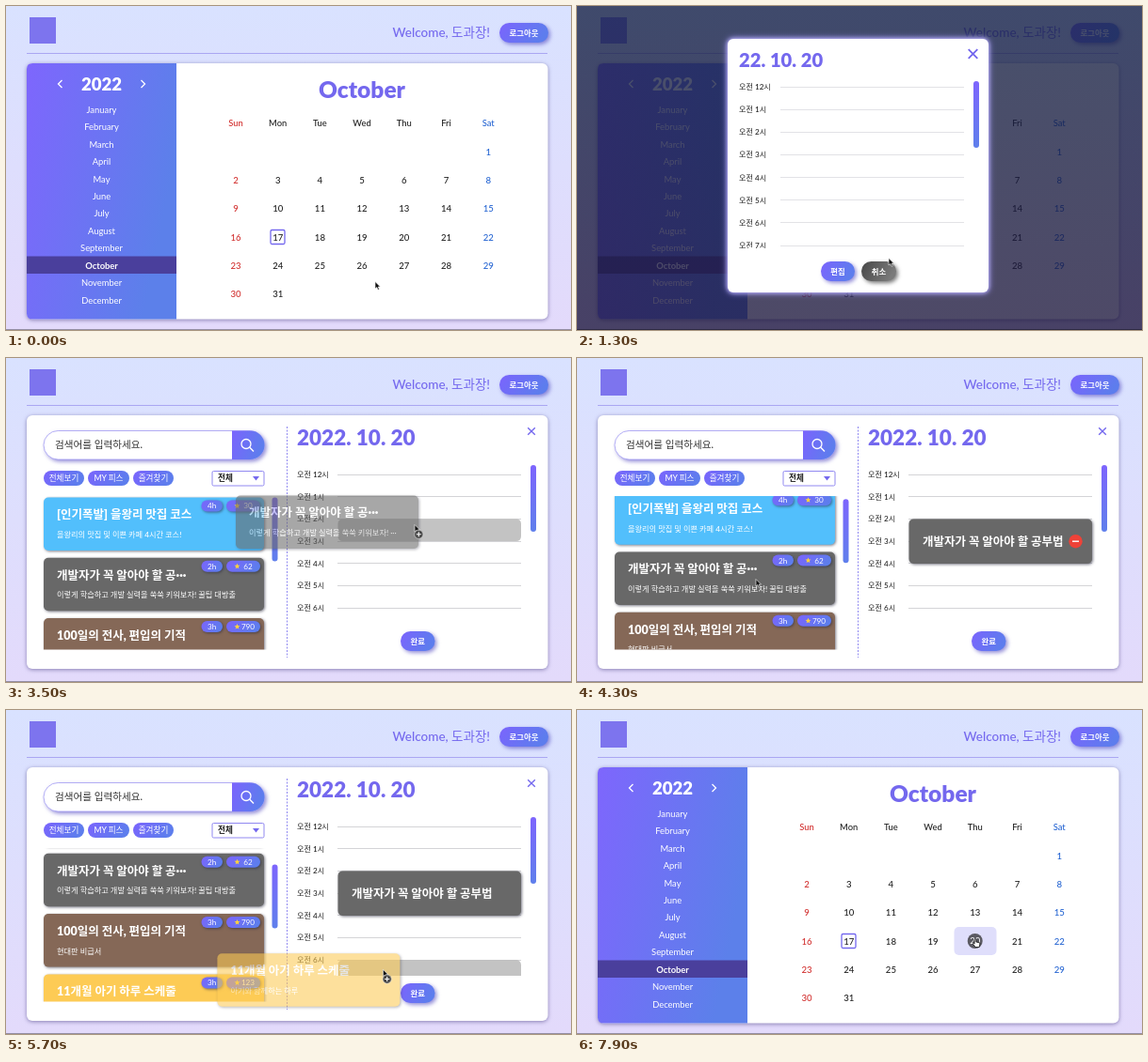
An HTML page for the animation above (8 s loop, 600 by 345 pixels).

```html
<!DOCTYPE html>
<html lang="ko">
<head>
<meta charset="utf-8">
<title>Calendar planner</title>
<style>
  html, body { margin: 0; width: 100%; height: 100%; overflow: hidden; background: #dee0fe; }
  svg { display: block; width: 100vw; height: 100vh; }
  text { font-family: Lato, 'Noto Sans CJK KR', 'Noto Sans CJK', sans-serif; white-space: pre; }
  .panel { filter: drop-shadow(0 1px 2px rgba(60, 50, 120, .55)); }
  .btn { filter: drop-shadow(2px 2px 2px rgba(75, 65, 190, .6)); }
  .dark { filter: drop-shadow(2px 2px 2px rgba(30, 30, 30, .6)); }
  .card { filter: drop-shadow(1px 1px 1.5px rgba(40, 40, 60, .6)); }
  .glow { filter: drop-shadow(0 0 2px #c4bcff) drop-shadow(0 0 3px #9c92f0); }
</style>
</head>
<body>
<svg id="stage" viewBox="0 0 600 345" preserveAspectRatio="none">
  <defs>
    <linearGradient id="bg" x2="0" y2="1"><stop stop-color="#d9e2ff"/><stop offset="1" stop-color="#e3dafb"/></linearGradient>
    <linearGradient id="side" x2="1" y2=".35"><stop stop-color="#7e66fd"/><stop offset="1" stop-color="#5c80ea"/></linearGradient>
    <linearGradient id="pill" x2="1" y2=".3"><stop stop-color="#7b64fd"/><stop offset="1" stop-color="#5d7ded"/></linearGradient>
    <linearGradient id="bar" x2="0" y2="1"><stop stop-color="#7d65fd"/><stop offset="1" stop-color="#5f7fec"/></linearGradient>
    <linearGradient id="gray" x2="1" y2=".3"><stop stop-color="#474747"/><stop offset="1" stop-color="#7a7a7a"/></linearGradient>
    <linearGradient id="shade" x2="0" y2="1"><stop stop-color="#141f42"/><stop offset="1" stop-color="#1c163c"/></linearGradient>
    <clipPath id="modalClip"><rect x="165" y="75" width="250" height="183"/></clipPath>
    <clipPath id="listClip"><rect x="36" y="147" width="243" height="163.5"/></clipPath>
    <clipPath id="dayClip"><rect x="305" y="110" width="246" height="173"/></clipPath>
  </defs>
</svg>
<script>
const NS = 'http://www.w3.org/2000/svg';
const LOOP = 8000, STEP = 100;
const PURPLE = '#7468ee';

function el(parent, tag, attrs, str) {
  const node = document.createElementNS(NS, tag);
  for (const k in attrs) node.setAttribute(k, attrs[k]);
  if (str !== undefined) node.textContent = str;
  parent.appendChild(node);
  return node;
}
const group = (p, attrs = {}) => el(p, 'g', attrs);
const rect = (p, x, y, width, height, fill, rx = 0, attrs = {}) =>
  el(p, 'rect', { x, y, width, height, fill, rx, ...attrs });
const path = (p, d, stroke, width = 1, attrs = {}) =>
  el(p, 'path', { d, stroke, 'stroke-width': width, fill: 'none', ...attrs });
// y is the optical middle of the line
const text = (p, x, y, str, size, fill, weight = 400, anchor = 'start') =>
  el(p, 'text', { x, y: y + size * .36, 'font-size': size, fill, 'font-weight': weight, 'text-anchor': anchor }, str);
const show = (node, on) => node.setAttribute('display', on ? 'inline' : 'none');
const move = (node, x, y) => node.setAttribute('transform', `translate(${x} ${y})`);

function button(p, x, y, w, h, label, fill = 'url(#pill)', cls = 'btn') {
  rect(p, x, y, w, h, fill, h / 2, { class: cls });
  text(p, x + w / 2, y + h / 2, label, 8.4, '#fff', 700, 'middle');
}
function chip(p, x, w, label) {
  rect(p, x, 120, w, 16, 'url(#pill)', 8);
  text(p, x + w / 2, 128, label, 8.6, '#fff', 500, 'middle');
}
function cross(p, x, y, r, width) {
  path(p, `M${x - r} ${y - r}L${x + r} ${y + r}M${x + r} ${y - r}L${x - r} ${y + r}`, PURPLE, width);
}
function hours(p, x, y, gap, x1, x2, count, color) {
  for (let i = 0; i < count; i++) {
    const mid = y + gap * i;
    text(p, x, mid, `오전 ${i || 12}시`, 8.1, '#222', 500);
    path(p, `M${x1} ${Math.floor(mid) + .5}H${x2}`, color);
  }
}

const svg = document.getElementById('stage');
rect(svg, 0, 0, 600, 345, 'url(#bg)');

// Header
rect(svg, 25, 12, 28, 28, '#7d74ee');
text(svg, 514, 28.5, 'Welcome, 도과장!', 13.5, PURPLE, 500, 'end');
button(svg, 524, 18, 52, 21, '로그아웃');
path(svg, 'M22 50.5H575', '#aaa6f2');

// Calendar page
const calendar = group(svg);
rect(calendar, 22, 61, 553.5, 272.5, '#fff', 6, { class: 'panel' });
path(calendar, 'M181 61H28Q22 61 22 67V327.500Q22 333.500 28 333.500H181Z', 'none', 0, { fill: 'url(#side)' });
text(calendar, 101.5, 83, '2022', 18.6, '#fff', 900, 'middle');
path(calendar, 'M59.500 79L55.500 83L59.500 87M143.500 79L147.500 83L143.500 87', '#fff', 1.3);
rect(calendar, 22, 266.5, 159, 18.5, '#4a3f9c');
'January February March April May June July August September October November December'
  .split(' ').forEach((name, i) =>
    text(calendar, 101.5, 110.5 + 18.42 * i, name, 9.4, '#fff', i === 9 ? 700 : 400, 'middle'));
text(calendar, 378, 89, 'October', 24.5, PURPLE, 900, 'middle');

const dayColor = c => c === 0 ? '#d2302f' : c === 6 ? '#2464d2' : '#222';
const colX = c => 244 + 44.7 * c;
const cell = group(calendar);
rect(cell, 400.5, 231, 45, 30, '#dfdefb', 5);
'Sun Mon Tue Wed Thu Fri Sat'.split(' ').forEach((name, c) =>
  text(calendar, colX(c), 125, name, 9.4, dayColor(c), 500, 'middle'));
for (let d = 1; d <= 31; d++) {
  const c = (d + 5) % 7, r = Math.floor((d + 5) / 7);
  text(calendar, colX(c), 155.5 + 30.2 * r, d, 9.6, dayColor(c), 500, 'middle');
}
rect(calendar, 281, 238.5, 15, 15, 'none', 1.5, { stroke: PURPLE, 'stroke-width': 1.3 });
const dot = group(calendar);
el(dot, 'circle', { cx: 422.7, cy: 246, r: 8, fill: '#5b5a62' });
text(dot, 422.7, 246, '20', 9.6, '#fff', 400, 'middle');

// Day dialog
const modal = group(svg);
rect(modal, 0, 0, 600, 345, 'url(#shade)', 0, { opacity: .78 });
rect(modal, 160, 35, 277, 270, '#fff', 6, { class: 'glow' });
text(modal, 172, 57.5, '22. 10. 20', 20.2, PURPLE, 900);
cross(modal, 420.5, 51, 4.8, 1.9);
hours(group(modal, { 'clip-path': 'url(#modalClip)' }), 172, 86, 24.15, 216, 411, 8, '#e2e2e6');
rect(modal, 421, 80, 6, 71, 'url(#bar)', 3);
button(modal, 259, 272, 36, 21, '편집');
button(modal, 302, 272, 37, 21, '취소', 'url(#gray)', 'dark');

// Planner page
const planner = group(svg);
rect(planner, 22, 61, 553.5, 270, '#fff', 6, { class: 'panel' });
path(planner, 'M298.500 73V319', '#8f88f0', 1, { 'stroke-dasharray': '2 1.5' });
rect(planner, 40, 77.5, 234.5, 30.5, '#fff', 15.2, { class: 'btn', stroke: '#a49ef4', 'stroke-width': .8 });
path(planner, 'M240 77.500H259.300A15.200 15.200 0 0 1 259.300 108H240Z', 'none', 0, { fill: 'url(#pill)' });
el(planner, 'circle', { cx: 255, cy: 91.5, r: 5, fill: 'none', stroke: '#fff', 'stroke-width': 1.3 });
path(planner, 'M258.600 95.100L263 99.500', '#fff', 1.4);
text(planner, 52, 92.5, '검색어를 입력하세요.', 10.6, '#333', 500);
chip(planner, 40, 43, '전체보기');
chip(planner, 87, 44, 'MY 피스');
chip(planner, 135, 43, '즐겨찾기');
rect(planner, 219, 120.5, 55, 15.5, '#fff', 1.5, { stroke: '#9088f0' });
text(planner, 225, 128.2, '전체', 8.6, '#222', 700);
path(planner, 'M262 126H269L265.500 130.500Z', 'none', 0, { fill: PURPLE });

const pieces = [
  { title: '[인기폭발] 을왕리 맛집 코스', sub: '을왕리의 맛집 및 이쁜 카페 4시간 코스!', time: '4h', likes: 30, fill: '#52bffc' },
  { title: '개발자가 꼭 알아야 할 공···', sub: '이렇게 학습하고 개발 실력을 쑥쑥 키워보자! 꿀팁 대방출', time: '2h', likes: 62, fill: '#686868' },
  { title: '100일의 전사, 편입의 기적', sub: '현대판 비급서', time: '3h', likes: 790, fill: '#856857' },
  { title: '11개월 아기 하루 스케줄', sub: '아기와 함께하는 하루', time: '3h', likes: 123, fill: '#fdcb55' }
];
function card(p, x, y, w, piece, sub = piece.sub) {
  rect(p, x, y, w, 56.5, piece.fill, 5, { class: 'card' });
  text(p, x + 14, y + 18.3, piece.title, 12.5, '#fff', 900);
  text(p, x + 14, y + 39.5, sub, 8.2, '#fff', 500);
}
const list = group(group(planner, { 'clip-path': 'url(#listClip)' }));
pieces.forEach((piece, i) => {
  const y = 148.5 + 64.3 * i;
  card(list, 40, y, 234, piece);
  rect(list, 207.5, y + 3, 22.5, 12, 'url(#pill)', 6, { class: 'card' });
  rect(list, 234, y + 3, 36, 12, 'url(#pill)', 6, { class: 'card' });
  text(list, 218.7, y + 9, piece.time, 8.2, '#fff', 400, 'middle');
  let star = '';
  for (let k = 0; k < 10; k++) {
    const a = Math.PI * k / 5, r = k % 2 ? 1.4 : 3.1;
    star += `${k ? 'L' : 'M'}${245.5 + r * Math.sin(a)} ${y + 9 - r * Math.cos(a)}`;
  }
  path(list, star + 'Z', 'none', 0, { fill: '#ffd23f' });
  text(list, 257, y + 9, piece.likes, 8.2, '#fff', 400, 'middle');
});
const listBar = rect(planner, 282.5, 148.5, 6, 68, 'url(#bar)', 3);

text(planner, 309, 85, '2022. 10. 20', 22.5, PURPLE, 900);
cross(planner, 558, 78, 3.8, 1.4);
const day = group(planner, { 'clip-path': 'url(#dayClip)' });
hours(day, 309, 124, 23.7, 352, 547, 7, '#d4d4d7');
rect(planner, 557, 114, 6, 71, 'url(#bar)', 3);
const slot = rect(day, 352.5, 171.4, 194.5, 23.7, '#b4b4b4', 5, { opacity: .8 });
const plan1 = group(day);
rect(plan1, 352.5, 171.4, 194.5, 47.5, pieces[1].fill, 5, { class: 'card' });
text(plan1, 367, 195.2, '개발자가 꼭 알아야 할 공부법', 12.5, '#fff', 900);
const remove = group(plan1);
el(remove, 'circle', { cx: 529.5, cy: 195.2, r: 7.2, fill: '#ee4238' });
path(remove, 'M526 195.200H533', '#fff', 1.4);
const plan2 = group(day);
rect(plan2, 352.5, 266.2, 194.5, 71, pieces[3].fill, 5, { class: 'card' });
button(planner, 419, 291, 36.5, 21, '완료');

// Dragged cards, drawn relative to the pointer
const ghost1 = group(svg, { opacity: .58 });
card(ghost1, -190, -31, 194, pieces[1], '이렇게 학습하고 개발 실력을 쑥쑥 키워보자! ···');
const ghost2 = group(svg, { opacity: .58 });
card(ghost2, -176, -17, 194, pieces[3]);

// Window edge
rect(svg, 0, 344, 600, 1, '#000', 0, { opacity: .35 });

// Pointer
const pointer = group(svg);
const arrow = path(pointer, 'M0 0V7.500L1.800 6L3 8.800L4.400 8.200L3.200 5.500H5.500Z', '#fff', .6, { fill: '#111' });
const hand = path(pointer, 'M-.9 .6Q0 -.6 .8 .6V3.500L4.200 4.200Q5 4.400 4.900 5.500L4.200 9H.2L-2.600 5.600Q-2.500 4.600 -1.500 5L-.9 5.600Z', '#111', .8, { fill: '#fff' });
const plus = group(pointer);
el(plus, 'circle', { cx: 4.3, cy: 10.3, r: 4.6, fill: '#4a4a4a', stroke: '#ddd', 'stroke-width': .6 });
path(plus, 'M1.800 10.300H6.800M4.300 7.800V12.800', '#fff', 1.1);

// time, x, y
const route = [
  [0, 392, 293.5], [200, 392, 293.5], [600, 423, 244], [900, 423, 244], [1300, 331, 268.5],
  [1600, 279, 282], [2000, 277, 281], [2500, 257.5, 242.5], [2700, 230, 244], [2800, 230, 244],
  [3500, 434, 177.5], [3800, 438, 180], [4200, 190, 235], [4700, 190, 240], [5000, 216, 297.5],
  [5200, 216, 297.5], [5900, 446, 271], [6000, 446, 271], [6400, 442, 302.5], [6800, 442, 302.5],
  [7300, 423, 243.5], [8000, 423, 243.5]
];
const ease = (t, a, b) => {
  const u = Math.min(1, Math.max(0, (t - a) / (b - a)));
  return u * u * (3 - 2 * u);
};
function pointerAt(t) {
  const i = Math.max(1, route.findIndex(k => k[0] > t));
  const a = route[i - 1], b = route[i], u = ease(t, a[0], b[0]);
  return [a[1] + (b[1] - a[1]) * u, a[2] + (b[2] - a[2]) * u];
}

function render(t) {
  const within = (a, b) => t >= a && t < b;
  const [x, y] = pointerAt(t);
  const inBox = (l, top, r, b) => x >= l && x <= r && y >= top && y <= b;
  const planning = within(2000, 6800), dialog = within(900, 2000);
  const drag1 = within(2800, 3800), drag2 = within(5200, 6000);
  const hover = !planning && !dialog && inBox(400, 231, 446, 261);

  show(calendar, !planning);
  show(planner, planning);
  show(modal, dialog);
  show(cell, hover);
  show(dot, hover);

  const scroll = 60 * ease(t, 4200, 4700);
  move(list, 0, -scroll);
  move(listBar, 0, scroll * .265);

  const over = (drag1 || drag2) && x > 352;
  show(slot, over);
  slot.setAttribute('y', drag1 ? 171.4 : 266.2);
  show(plan1, t >= 3800);
  show(remove, t < 5300);
  show(plan2, t >= 6000);
  show(ghost1, drag1);
  show(ghost2, drag2);
  move(ghost1, x, y);
  move(ghost2, x, y);

  const press = hover || (dialog && inBox(259, 272, 295, 293)) ||
    (planning && inBox(419, 291, 455, 312));
  move(pointer, x, y);
  show(hand, press);
  show(arrow, !press);
  show(plus, over);
}

function tick() {
  const t = performance.now() % LOOP;
  render(Math.floor(t / STEP) * STEP);
  requestAnimationFrame(tick);
}
tick();
</script>
</body>
</html>
```
